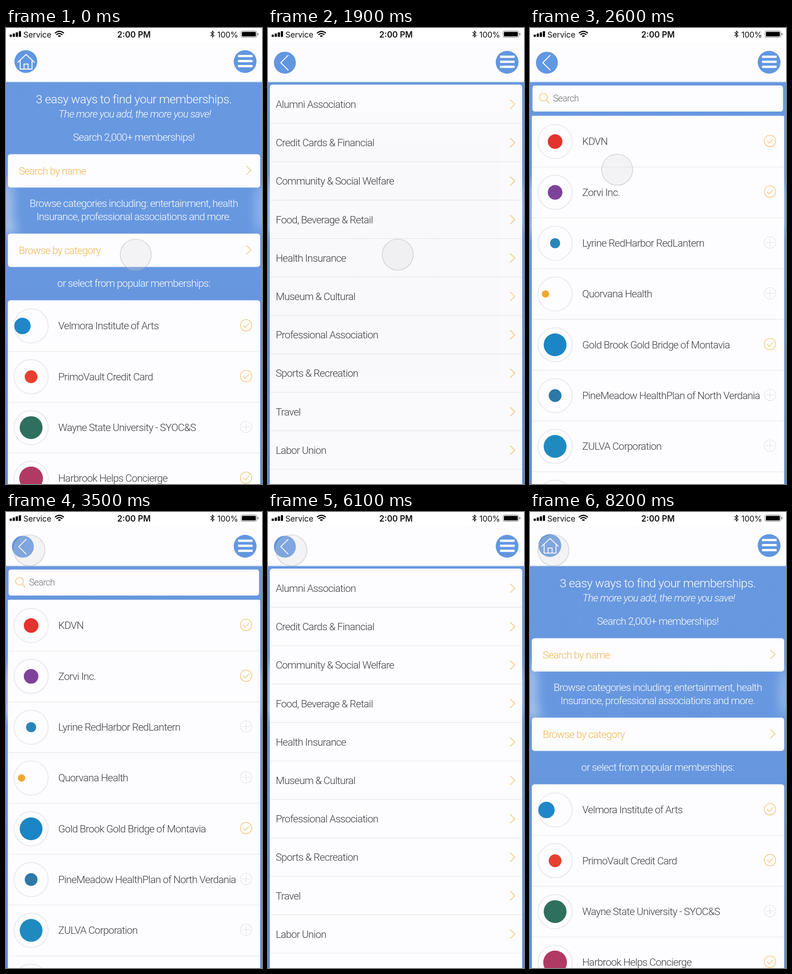
An HTML page for the animation above (8300 ms loop, 561 by 999 pixels).

```html
<!DOCTYPE html>
<html lang="en">
<head>
<meta charset="utf-8">
<title>Membership finder</title>
<style>
  html, body { margin: 0; width: 100%; height: 100%; overflow: hidden; background: #fff; }
  svg { display: block; width: 100vw; height: 100vh; }
  text { font: 300 22.5px Roboto, "Liberation Sans", sans-serif; letter-spacing: -0.8px; fill: #3c3b40; }
  .mid { text-anchor: middle; fill: #fff; }
  .title { font-size: 26.5px; letter-spacing: -0.6px; }
  .slant { font-style: italic; }
  .gold { fill: #f4b64c; }
  .hint { font-size: 20px; letter-spacing: -0.75px; fill: #6f6e73; }
  .status { font: 400 17.5px Inter, Roboto, sans-serif; letter-spacing: -0.2px; fill: #111; }
  .clock { font-weight: 600; font-size: 18px; letter-spacing: 0; text-anchor: middle; }
  .line { fill: none; stroke-linecap: round; stroke-linejoin: round; }
</style>
</head>
<body>
<svg id="stage" viewBox="0 0 561 999" preserveAspectRatio="none">
  <defs>
    <linearGradient id="sky" x2="0" y2="1">
      <stop offset="0" stop-color="#6898e0"/>
      <stop offset=".55" stop-color="#6797df"/>
      <stop offset="1" stop-color="#5f8cd8"/>
    </linearGradient>
    <filter id="soft" x="-100%" y="-100%" width="300%" height="300%"><feGaussianBlur stdDeviation="11"/></filter>
  </defs>
</svg>
<script>
const LOOP = 8300, BLUE = '#6297e1', PAPER = '#fdfcfe', GOLD = '#f4c878', PALE = '#e7e6ea';
const stage = document.getElementById('stage');

const rect = (x, y, w, h, fill, r = 0) =>
  `<rect x="${x}" y="${y}" width="${w}" height="${h}" rx="${r}" fill="${fill}"/>`;
const circle = (x, y, r, fill, stroke = 'none', width = 1.5) =>
  `<circle cx="${x}" cy="${y}" r="${r}" fill="${fill}" stroke="${stroke}" stroke-width="${width}"/>`;
const line = (d, color, width) => `<path class="line" d="${d}" stroke="${color}" stroke-width="${width}"/>`;
const text = (x, y, s, cls = '') =>
  `<text x="${x}" y="${y}" class="${cls}">${s.replace(/&/g, '&amp;')}</text>`;
const rule = y => rect(5, y, 551, 1.5, '#ebeaee');
const chevron = (x, y) => line(`M${x} ${y - 9.5}l10 9.5l-10 9.5`, GOLD, 1.6);

const cloud = (x, y, rx, ry, a) =>
  `<ellipse cx="${x}" cy="${y}" rx="${rx}" ry="${ry}" fill="#fff" opacity="${a}" filter="url(#soft)"/>`;
const backdrop = rect(0, 0, 561, 999, 'url(#sky)') + cloud(2, 390, 14, 60, .4) + cloud(10, 440, 16, 18, .25) +
  cloud(558, 395, 12, 55, .3) + cloud(335, 735, 24, 34, .16) + cloud(340, 965, 20, 14, .1);

const header = y => rect(0, 0, 561, 118, PAPER) + rect(0, 117.5, 561, 1.5, '#b9cfee') + circle(524, y, 25, BLUE) +
  [-11, 0, 11].map(d => rect(508.5, y - 1 + d - 2.5, 32, 5, '#fff', 1)).join('');
const backButton = circle(37, 76, 24, BLUE) + line('M44 60L28 76L44 92', '#fff', 2);
const homeButton = circle(43.5, 73.5, 25, BLUE) +
  line('M26 75L44 58L62 75M31 72V90H57V72M39.5 90V79H48.5V90', '#fff', 2);

const mark = (y, chosen) => chosen
  ? circle(526, y, 12.5, 'none', GOLD, 1.5) + line(`M520 ${y + .5}l4 4.5l8.5-9`, GOLD, 1.5)
  : circle(526, y, 12.5, 'none', PALE) + line(`M518 ${y}h16M526 ${y - 8}v16`, PALE, 1.5);

// Each member: name, chosen, badge colour, badge radius, badge x
function memberList(top, members) {
  return members.map(([name, chosen, color, r, x = 55], i) => {
    const y = top + 55.3 + i * 111.3;
    return (r ? circle(x, y + .5, r, color) : '') + circle(55, y + .5, 37.5, 'none', '#e4e3e7') +
      text(114.5, y + 8, name) + mark(y - 1, chosen) + rule(y + 55.5);
  }).join('');
}

const popular = [
  ['Velmora Institute of Arts', 1, '#1f86c8', 18, 36],
  ['PrimoVault Credit Card', 1, '#e8402f', 14],
  ['Wayne State University - SYOC&S', 0, '#2f6f5d', 25],
  ['Harbrook Helps Concierge', 1, '#b03a64', 26]
];
const insurers = [
  ['KDVN', 1, '#e5322d', 16],
  ['Zorvi Inc.', 1, '#7d4299', 16],
  ['Lyrine RedHarbor RedLantern', 0, '#2a86b8', 11],
  ['Quorvana Health', 0, '#f2a62c', 8, 34],
  ['Gold Brook Gold Bridge of Montavia', 1, '#1b86c4', 25],
  ['PineMeadow HealthPlan of North Verdania', 0, '#2d78a8', 14],
  ['ZULVA Corporation', 0, '#1f8ac0', 25],
  ['', 0, '', 0]
];
const categories = ['Alumni Association', 'Credit Cards & Financial', 'Community & Social Welfare',
  'Food, Beverage & Retail', 'Health Insurance', 'Museum & Cultural', 'Professional Association',
  'Sports & Recreation', 'Travel', 'Labor Union', ''];

const field = (y, label) => rect(4, y, 553, 73, PAPER, 6) + text(28, y + 44, label, 'gold') + chevron(527, y + 35.5);

const home = backdrop + header(73.5) + homeButton +
  text(280, 165, '3 easy ways to find your memberships.', 'mid title') +
  text(282, 196, 'The more you add, the more you save!', 'mid slant') +
  text(280, 247, 'Search 2,000+ memberships!', 'mid') + field(276.5, 'Search by name') +
  text(280, 392, 'Browse categories including: entertainment, health', 'mid') +
  text(280, 421, 'Insurance, professional associations and more.', 'mid') + field(450.5, 'Browse by category') +
  text(280, 567, 'or select from popular memberships:', 'mid') +
  rect(4, 596.5, 553, 420, PAPER, 6) + memberList(597, popular);

const search = backdrop + header(75) + backButton + rect(5.5, 126, 549, 57, PAPER, 5) +
  circle(29.5, 151.5, 8.5, 'none', GOLD, 1.7) + line('M35.5 158L42 165', GOLD, 1.7) +
  text(50.5, 160.5, 'Search', 'hint') + rect(4, 192.5, 553, 4, PAPER, 1.5) +
  `<g id="results">${rect(4, 192.5, 553, 830, PAPER, 6)}${memberList(193, insurers)}</g>`;

const browse = backdrop + header(75) + backButton + rect(4, 124, 553, 900, PAPER, 6) +
  categories.map((name, i) => {
    const y = 167 + i * 84.2;
    return text(17, y + 8, name) + chevron(531, y) + rule(y + 41);
  }).join('');

const status = rect(0, 0, 561, 31, '#fff') +
  [5, 7.5, 10, 12.5].map((h, i) => rect(8 + i * 6.7, 19.5 - h, 4.8, h, '#000', 1)).join('') +
  text(38, 20.5, 'Service', 'status') +
  line('M108 10.8Q117 3.6 126 10.8M111.2 14.2Q117 9.6 122.8 14.2', '#000', 2.4) + line('M115.8 17.6h2.4', '#000', 3.4) +
  text(280.5, 20.5, '2:00 PM', 'status clock') +
  line('M448.5 9.5L456 16.8L452.2 20.3V6.5L456 10L448.5 17.3', '#111', 1.4) + text(463, 20.5, '100%', 'status') +
  '<rect x="515" y="6.5" width="34.5" height="14" rx="3" fill="#fff" stroke="#777"/>' +
  rect(517, 8.5, 30.5, 10, '#000', 1.5) + rect(551, 11, 2, 5, '#777', 1);

const spinner = circle(281, 514, 96.5, 'none', '#65809d', 5) +
  '<path id="arc" d="M212.8 445.8A96.5 96.5 0 0 1 349.2 445.8" fill="none" stroke="#c9d8f6" stroke-width="5"/>';

stage.insertAdjacentHTML('beforeend',
  `<g>${home}</g><g id="search">${search}</g><g id="browse">${browse}</g>
   <g id="loading">${rect(0, 0, 561, 999, 'rgba(0,0,0,.55)')}${spinner}</g>${status}
   <circle id="touch" r="34" fill="rgba(212,212,212,.25)" stroke="rgba(180,182,184,.7)" stroke-width="1.2"/>`);

const el = id => document.getElementById(id);
const [searchPage, results, browsePage, loading, arc, touch] =
  ['search', 'results', 'browse', 'loading', 'arc', 'touch'].map(el);
const ramp = (t, from, to) => Math.min(1, Math.max(0, (t - from) / (to - from)));
const show = (node, opacity) => {
  node.style.display = opacity > 0 ? '' : 'none';
  node.setAttribute('opacity', opacity);
};

function draw(t) {
  show(searchPage, t >= 1900 && t < 5200 ? 1 : 0);
  show(results, ramp(t, 2400, 2450));
  show(browsePage, ramp(t, 1600, 1800) - ramp(t, 1900, 2000) + ramp(t, 4850, 5200) - ramp(t, 6550, 6900));
  show(loading, ramp(t, 1900, 2000) - ramp(t, 2400, 2500));
  arc.setAttribute('transform', `rotate(${(t - 1912) * .36} 281 514)`);

  const u = ramp(t, 1900, 3400), eased = u * u * (3 - 2 * u);
  touch.setAttribute('cx', 284.3 - 233 * eased ** 1.15);
  touch.setAttribute('cy', 496.5 - 412.5 * eased);
}

const start = performance.now();
function tick(now) {
  draw(Math.max(0, now - start) % LOOP);
  requestAnimationFrame(tick);
}
draw(0);
requestAnimationFrame(tick);
</script>
</body>
</html>
```
